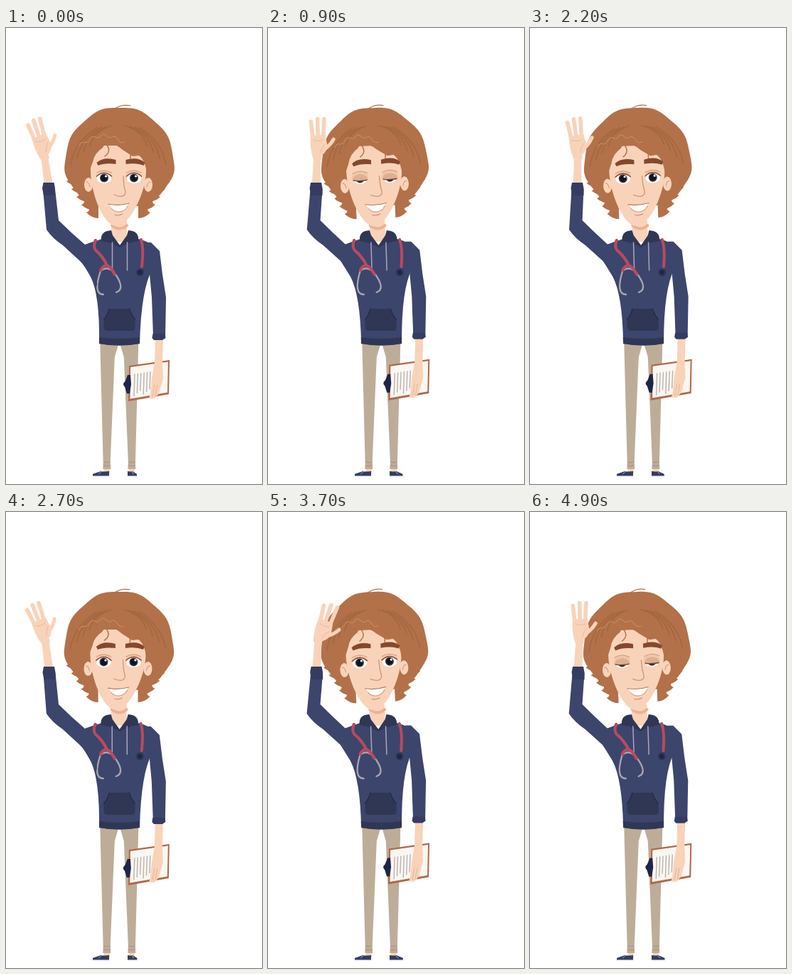
Recreate the animation shown at these times as an HTML page with a canvas. Size 360 by 640 pixels, loop 5 s.

```html
<!DOCTYPE html>
<html lang="en">
<head>
<meta charset="utf-8">
<title>Waving medic</title>
<style>
html, body { margin: 0; width: 100%; height: 100%; overflow: hidden; background: #fff; }
canvas { display: block; width: 360px; height: 640px; }
</style>
</head>
<body>
<canvas id="stage" width="360" height="640"></canvas>
<script>
const ctx = document.getElementById('stage').getContext('2d');
const LOOP = 5000, STEP = 100, WAVE = 2000 / 3, BLINK = 2000;
const C = {
  skin: '#f8d3b9', shade: '#e8b394', line: '#cf9676', lid: '#ddb08f',
  hair: '#b27149', hairDark: '#a3673f', hairLight: '#c68c60', brow: '#84492d',
  navy: '#3c456c', cuff: '#343c62', deep: '#303754', ink: '#1f2547',
  tube: '#b94a60', metal: '#aaa5ae', pants: '#bdad98', pantsDark: '#a5947f',
  board: '#b2684a', paper: '#faf7f2', rule: '#b9b1ad'
};
const rad = deg => deg * Math.PI / 180;

function fill(d, color) {
  ctx.fillStyle = color;
  ctx.fill(new Path2D(d));
}
function stroke(d, color, width) {
  ctx.strokeStyle = color;
  ctx.lineWidth = width;
  ctx.stroke(new Path2D(d));
}
function dot(x, y, rx, color, ry = rx) {
  ctx.fillStyle = color;
  ctx.beginPath();
  ctx.ellipse(x, y, rx, ry, 0, 0, 7);
  ctx.fill();
}
function group(draw) {
  ctx.save();
  draw();
  ctx.restore();
}
// Draws twice, flipped around the vertical axis at x.
function mirror(x, draw) {
  for (const side of [-1, 1]) group(() => {
    ctx.translate(x, 0);
    ctx.scale(side, 1);
    draw();
  });
}
// A limb runs through [x, y, half width] joints.
function limb(color, ...joints) {
  const left = joints.map(([x, y, w]) => `${x - w} ${y}`);
  const right = joints.map(([x, y, w]) => `${x + w} ${y}`).reverse();
  fill('M' + left.concat(right).join('L') + 'Z', color);
}

function shoe(heel, toe) {
  const mid = (heel + toe) / 2;
  fill(`M${heel} 629V622Q${mid} 623 ${mid} 622L${toe} 626V629Z`, C.cuff);
  stroke(`M${heel} 628.800H${toe}M${mid} 623L${mid + (toe - heel) / 8} 626`, '#d0d0dc', .8);
}

function legs(k) {
  mirror(159.3, () => {
    limb(C.skin, [17.5, 614, 4], [17.5, 625, 4]);
    limb(C.pants, [13.5, 440, 13.5], [16.5, 462, 10], [17.6, 610, 5], [17.5, 619, 5.5]);
    for (const y of [609, 614]) stroke(`M13 ${y}Q18 ${y + 2} 22 ${y}`, C.pantsDark, 1);
  });
  shoe(145, 122);
  shoe(171, 184 + 6 * k);
}

// The upper body leans from the hips.
function lean(k) {
  const slope = 5.5 * k / 150;
  ctx.transform(1, 0, slope, 1, -440 * slope, 0);
}

function strap() {
  stroke('M126 298Q122 306 126 312 136 320 142 333', C.tube, 4);
}

function torso(k) {
  lean(k);
  limb(C.skin, [159, 270, 11], [159, 300, 11]);
  stroke('M149 277Q160 286 170 277', C.shade, 4);
  fill('M132 297L148 291 160 305 172 291 186 296Q206 301 207 310L206 338Q190 366 188 443 159 448 131 443 132 375 119 349L106 327 112 304Z', C.navy);
  fill('M131 434Q159 438 188 434V443Q159 448 131 443Z', C.deep);
  mirror(160, () => {
    fill('M0 308Q14 300 26 299 28 285 12 284L10 291 0 305Z', C.deep);
    stroke('M10.500 301V340', '#aaa7bb', 1.5);
  });
  mirror(159.500, () => {
    fill('M-1 394H14Q17 404 22 409V421Q21 425 17 425H-1Z', C.deep);
    stroke('M14 394Q17 404 22 409', C.ink, 1);
  });
  stroke('M133 341Q122 374 137 374M152 343Q169 366 155 371M133 341Q142 333 152 343', C.metal, 2.3);
  stroke('M133 340Q142 324 153 346M190 297Q194 310 191 335', C.tube, 4);
  strap();
  dot(188.5, 343, 5.5, C.deep);
  dot(188.5, 343, 3.2, C.ink);
}

function clipboard() {
  fill('M173 474L230 466 229 514 172 524Z', C.board);
  fill('M175 476L228 468.500 227 511.500 174.500 520.500Z', C.paper);
  for (let i = 0; i < 6; i++) {
    const x = 181 + i * 4.4, y = 486 - i * .7;
    stroke(`M${x} ${y}l-1 ${30 - i % 3 * 3}`, C.rule, 1.4);
  }
  limb(C.ink, [173, 487, 2], [171, 500, 5], [172, 513, 2]);
  stroke('M168 497Q164 500 168 503', C.ink, 2);
}

function rightArm(k) {
  ctx.translate(-3 * k, -1.5 * k);
  clipboard();
  limb(C.skin, [215.5, 434, 5.5], [214.5, 470, 5.5], [213, 492, 8], [209, 513, 6], [205, 520, 4]);
  for (const x of [207, 211]) stroke(`M${x + 2} 501L${x - 1} 517`, C.shade, 1);
  limb(C.navy, [200, 301, 4], [207, 313, 9], [211, 346, 9], [215, 378, 10], [215.5, 434, 8.5]);
  limb(C.cuff, [215, 429, 8.5], [215, 435, 9.5], [214, 438, 6]);
}

function hand(deg) {
  ctx.rotate(rad(deg));
  fill('M-6 4Q-11 -12 -10 -29L11 -30 14 -14Q13 -6 6 -1V5Z', C.skin);
  for (let i = 0; i < 3; i++)
    stroke(`M${7.5 * i - 7} -28L${9.3 * i - 9.6} ${i ? -52.5 : -48.5}`, C.skin, 5.6);
  stroke('M10 -10Q18 -16 22.500 -24', C.skin, 5);
  stroke('M-6 -23Q2 -20 8 -23M10 -17Q5 -11 4 -5', C.shade, .8);
}

function leftArm(k, deg) {
  const wrist = 54 + 17 * k, cuff = 60 + 8.3 * k;
  const elbow = 57 - 2.5 * k, inner = elbow + 17 + 2 * k;
  const arm = 106 - 2 * k, shoulder = 128 - 5 * k;
  limb(C.skin, [wrist, 179, 5], [cuff, 222, 6]);
  group(() => {
    ctx.translate(wrist, 180);
    hand(deg);
  });
  fill(`M${cuff - 8} 226H${cuff + 9}L${inner} 270Q${inner + 17} 287 ${arm + 5} 304L${shoulder} 298V362L${arm + 13} 349Q${arm + 6} 335 ${arm - 2} 327L${elbow + 23} 305Q${elbow + 8} 295 ${elbow} 283Z`, C.navy);
  limb(C.cuff, [cuff, 217, 7.5], [cuff, 225, 9], [cuff + 1, 235, 8]);
}

function hairBack() {
  ctx.fillStyle = C.hair;
  ctx.beginPath();
  for (let a = 0; a < 360; a += 3) {
    const s = Math.sin(rad(a)), r = 1 + .012 * Math.sin(rad(a * 9));
    ctx.lineTo(159.5 + 77 * r * Math.cos(rad(a)), 192 + (s < 0 ? 81 : 62) * r * s);
  }
  ctx.fill();
  mirror(158, () => {
    for (let i = 0; i < 5; i++) {
      const x = 73 - 7 * i, y = 215 + 11 * i, root = 40 - 3 * i;
      fill(`M${root} ${y - 20}L${x - 3} ${y - 9}Q${x - 6} ${y - 2} ${x} ${y}Q${x - 8} ${y + 8} ${root} ${y + 8}Z`, C.hair);
    }
  });
}

function hairFront() {
  fill('M112 212Q118 200 122 188 124 176 136 168L141 160Q154 162 164 171L178 180 187 179Q197 186 199 212L214 170Q200 130 160 128 110 130 104 190Z', C.hair);
  mirror(158, () => {
    for (let i = 0; i < 4; i++)
      stroke(`M${67 - 9 * i} ${192 - 9 * i}Q${62 - 9 * i} ${160 - 5 * i} ${30 - 7 * i} ${140 - i}`, C.hairDark, 1.6);
  });
  let curl = 'M103 165';
  for (let x = 104; x < 168; x++)
    curl += `L${x} ${165 - 14 * Math.sin((x - 103) / 22) + 2 * Math.sin(x / 2.5)}`;
  stroke(curl, C.hairLight, 1.1);
  stroke('M141 163Q149 173 139 180M172 165Q176 174 175 183', C.hair, 1.5);
  stroke('M148 117Q160 106 175 109', C.hair, 1.2);
}

function eye(x, lid) {
  const y = 211, w = 10.5;
  dot(x, y - 2, 11.5, '#f0c5a7', 9);
  group(() => {
    ctx.beginPath();
    ctx.ellipse(x, y, w, 7, 0, 0, 7);
    ctx.clip();
    ctx.fillStyle = '#fff';
    ctx.fillRect(x - 12, y - 8, 24, 16);
    dot(x, y - .5, 6, '#3d3d4a');
    dot(x, y - .5, 4.7, '#14141f');
    dot(x + 2.5, y - 3, 1.6, '#fff');
    if (lid > 0) {
      const drop = 15 * lid;
      ctx.fillStyle = C.lid;
      ctx.fillRect(x - 12, y - 8, 24, drop);
      stroke(`M${x - w} ${y + drop - 9}q${w} 2 ${2 * w} 0`, C.brow, 1.5);
    }
  });
  if (lid < .3) stroke(`M${x - w} ${y - 3}q${w} -9 ${2 * w} 0`, C.brow, 1.5);
  stroke(`M${x - w} ${y - 8}q${w} -6 ${2 * w} 0`, C.line, 1);
}

function head(k, lid) {
  const squeeze = draw => group(() => {
    ctx.translate(160, 0);
    ctx.scale(1 - .025 * k, 1);
    ctx.translate(-160, 0);
    draw();
  });
  ctx.translate(160 - 5.8 * k, 285);
  ctx.rotate(rad(-2.7 * k));
  ctx.translate(-160, -285);
  squeeze(hairBack);
  mirror(158, () => {
    dot(42, 220, 6, C.skin, 10);
    stroke('M45 216Q41 216 40 223', C.line, 1);
  });
  fill('M119 200C119 232 137 278 155 278S197 232 197 200V165H119Z', C.skin);
  squeeze(hairFront);
  mirror(161.5, () => fill('M7 185Q24 180 34 189L32 193Q22 189 7 191Z', C.brow));
  eye(138, lid);
  eye(180, lid);
  stroke('M165 208Q165 220 168 231 166 240 152 234', C.line, 1.3);
  fill('M145 247Q159 250 172 246 170 257 159 258 149 257 145 247Z', '#fff');
  stroke('M144 247Q159 250 173 246', '#b8795d', 1.2);
  stroke('M148 253Q152 258 159 258 168 257 171 250', C.line, 1);
  stroke('M153 262Q158 264 164 261', C.line, 1.2);
}

function render(time) {
  const t = Math.floor(time % LOOP / STEP) * STEP;
  const phase = t / WAVE * 360;
  const k = (.978 - Math.cos(rad(phase + 12))) / 1.89;
  const wave = .5 + 21 * Math.cos(rad(phase - 216));
  const lid = Math.max(0, 1 - Math.abs(t % BLINK - 950) / 170);

  ctx.fillStyle = '#fff';
  ctx.fillRect(0, 0, 360, 640);
  ctx.lineCap = ctx.lineJoin = 'round';
  legs(k);
  group(() => torso(k));
  group(() => rightArm(k));
  group(() => head(k, lid));
  leftArm(k, wave);
  // The strap lies over the raised shoulder.
  group(() => {
    lean(k);
    strap();
  });
}

const start = performance.now();
function tick() {
  render(performance.now() - start);
  requestAnimationFrame(tick);
}
tick();
</script>
</body>
</html>
```
